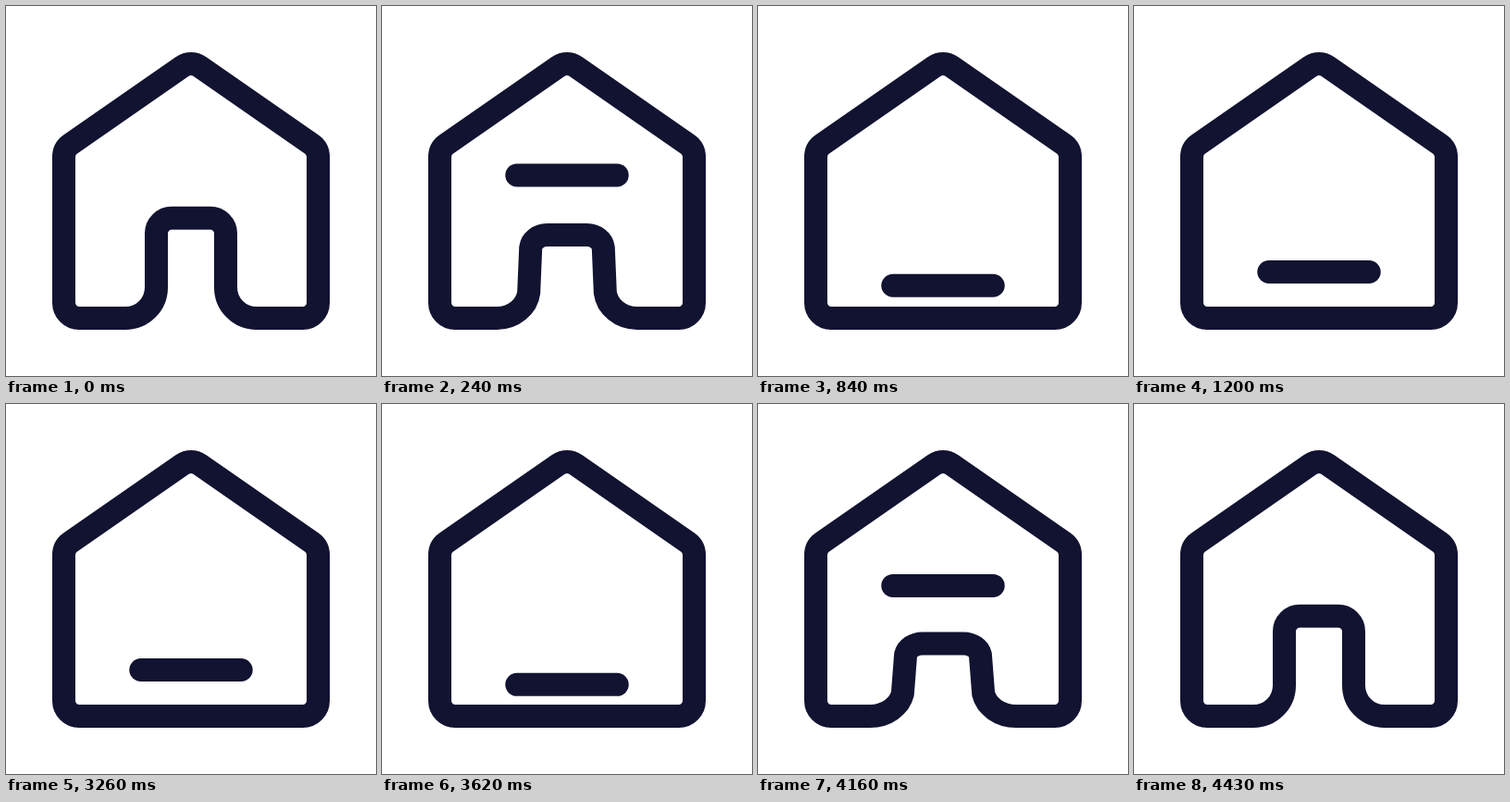
Write an HTML page that moves like this. It is 400x400 px and loops after 5660 ms.

```html
<!DOCTYPE html>
<html lang="en">
<head>
<meta charset="utf-8">
<title>Home icon</title>
<style>
  html, body { margin: 0; width: 100%; height: 100%; overflow: hidden; background: #fff; }
  svg { display: block; width: 100%; height: 100%; }
</style>
</head>
<body>
<svg viewBox="0 0 400 400">
  <clipPath id="inside"><path d="M62.5 155L200 60L337.5 155V337.5H62.5Z"/></clipPath>
  <g fill="none" stroke="#121331" stroke-width="25" stroke-linecap="round" stroke-linejoin="round">
    <g clip-path="url(#inside)"><path id="bar"/></g>
    <path id="house"/>
  </g>
</svg>
<script>
const LOOP = 5660, STEP = 30, STEPS = 40, HALF = 20, RETURN_AT = 3230;
const FLOOR = 337.5, ROOF_Y = 62, LOW_Y = 305.3, REST_Y = 287.5;

const corner = (x, y) => `A16.67 16.67 0 0 1 ${x} ${y}`;
const ROOF = 'M62.5 163.3' + corner(69.6, 149.6) + 'L190.5 65.5' + corner(209.5, 65.5) +
  'L330.4 149.6' + corner(337.5, 163.3) + 'V320.8' + corner(320.8, FLOOR);

// Left half of the doorway: open x, open y, x when flattened into the floor
const DOOR = [
  [129.2, 337.5, 100], [147.6, 337.5, 115], [162.5, 322.6, 128], [162.5, 304.2, 140],
  [162.5, 245.8, 152], [162.5, 236.6, 158], [170, 229.2, 165], [179.2, 229.2, 175]
];

const bar = document.getElementById('bar');
const house = document.getElementById('house');
const lerp = (a, b, k) => a + (b - a) * k;

// cubic-bezier(.833, 0, .167, 1)
function ease(x) {
  let lo = 0, hi = 1, s = 0.5;
  for (let i = 0; i < 30; i++) {
    s = (lo + hi) / 2;
    const bx = 2.5 * s * (1 - s) ** 2 + 0.5 * s * s * (1 - s) + s ** 3;
    if (bx < x) lo = s; else hi = s;
  }
  return s * s * (3 - 2 * s);
}

// Runs over the roof, then along the floor and doorway from right to left
function housePath(flat) {
  const left = DOOR.map(([x, y, flatX]) => [lerp(x, flatX, flat), lerp(y, FLOOR, flat)]);
  const right = left.map(([x, y]) => [400 - x, y]);
  const half = p => `L${p[0]}C${p.slice(1, 4)}L${p[4]}C${p.slice(5)}`;
  return ROOF + half(right) + half(left.reverse()) + 'H79.2' + corner(62.5, 320.8) + 'Z';
}

function barY(step) {
  return step < HALF
    ? lerp(LOW_Y, ROOF_Y, (1 - step / HALF) ** 1.345)
    : lerp(LOW_Y, REST_Y, ease((step - HALF) / HALF));
}

function draw(now) {
  const t = now % LOOP;
  const count = start => Math.min(STEPS, Math.floor((t - start) / STEP));
  const step = t < RETURN_AT ? count(0) : STEPS - count(RETURN_AT);
  house.setAttribute('d', housePath(step < HALF ? ease(step / HALF) : 1));
  bar.setAttribute('d', `M145.8 ${barY(step)}H254.2`);
}

let begin;
function tick(now) {
  begin ??= now;
  draw(now - begin);
  requestAnimationFrame(tick);
}
draw(0);
requestAnimationFrame(tick);
</script>
</body>
</html>
```
